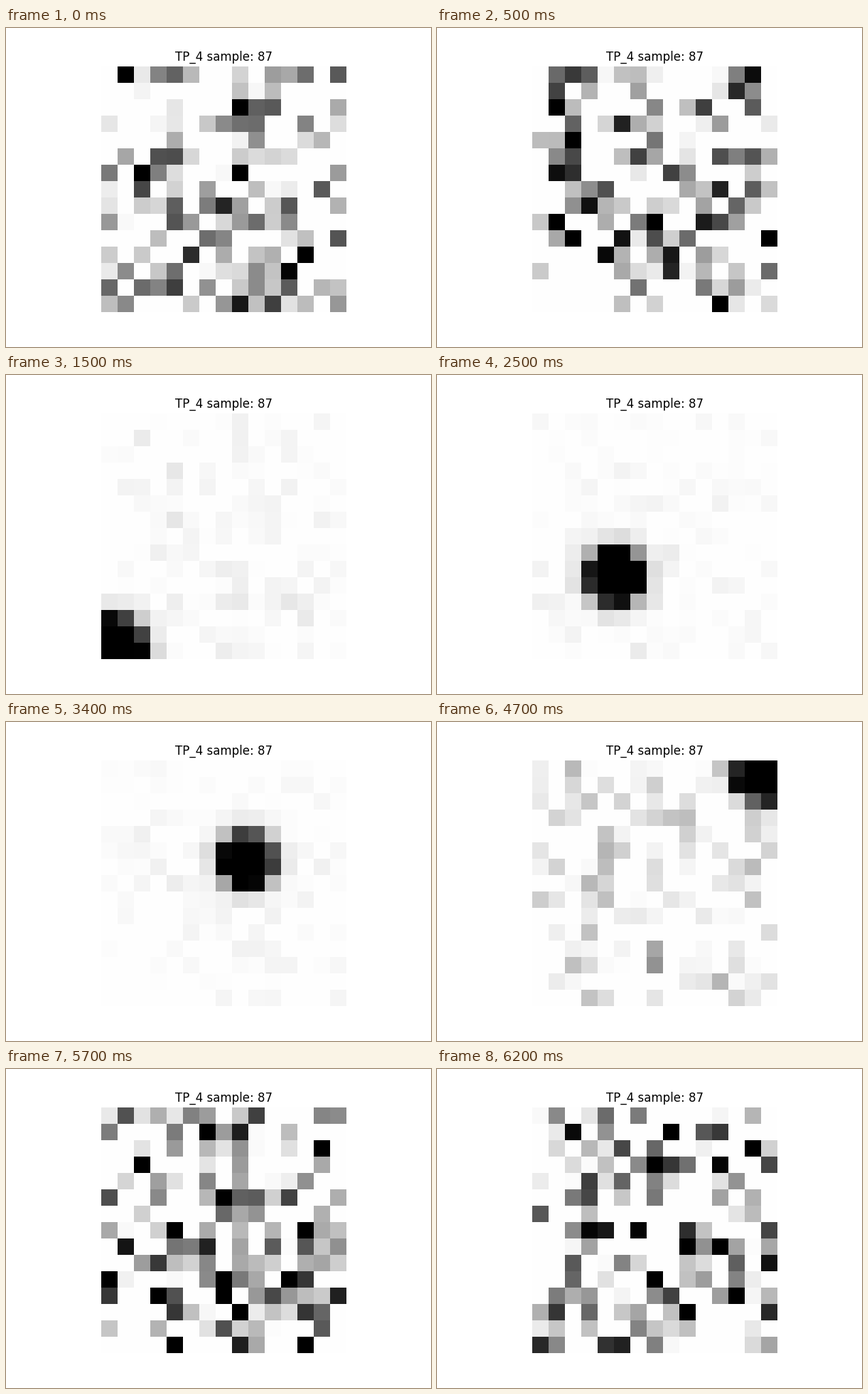
Recreate the animation shown at these times as a matplotlib script. Size 598x448 px, loop 6300 ms.

```python
import numpy as np
import matplotlib.pyplot as plt
from matplotlib.animation import FuncAnimation

N = 15                      # sensor cells per side
FRAMES, STEP_MS = 63, 100
HOLDS = (17, 32, 37)        # readings repeated from the step before
TOUCH = range(15, 49)       # frames with contact

KNOTS = (15, 32, 44)        # contact path, in steps without the holds
row, col = np.mgrid[:N, :N]


def step_of(i):
    return i - sum(h <= i for h in HOLDS)


def contact(step):
    """Pressure disc sliding up the diagonal."""
    along = np.interp(step, KNOTS, (0.3, 8.4, 13.8))
    if step > KNOTS[-1]:
        along += 0.45 * (step - KNOTS[-1])
    spread = np.interp(step, KNOTS, (0.18, 0.0, 0.22))
    dist = np.hypot(col - along, row - (N - 1 - along)) - spread
    return np.interp(dist, (1.5, 1.7, 2.0, 2.4, 3.1),
                     (1.0, 0.67, 0.3, 0.1, 0.0))


def noise_level(i):
    if i not in TOUCH:
        return 0.58
    return np.interp(i, (15, 16, 24, 25, 44, 45, 47, 48),
                     (0.035, 0.015, 0.012, 0.022, 0.03, 0.06, 0.14, 0.3))


def reading(i):
    if i in HOLDS:
        i -= 1
    step = step_of(i)
    rng = np.random.default_rng(870 + step)
    grid = noise_level(i) * np.maximum(rng.standard_normal((N, N)), 0)
    grid += 0.006
    if i in TOUCH:
        grid += contact(step)
    return np.clip(grid, 0, 1)


fig, ax = plt.subplots(figsize=(5.98, 4.48), dpi=100)
image = ax.imshow(reading(0), cmap="gray_r", vmin=0, vmax=1,
                  interpolation="nearest")
ax.set_title("TP_4 sample: 87", fontname="DejaVu Sans", fontsize=12)
ax.axis("off")


def update(i):
    image.set_data(reading(i))
    return (image,)


anim = FuncAnimation(fig, update, frames=FRAMES, interval=STEP_MS,
                     repeat=True, repeat_delay=0)
plt.show()
```
